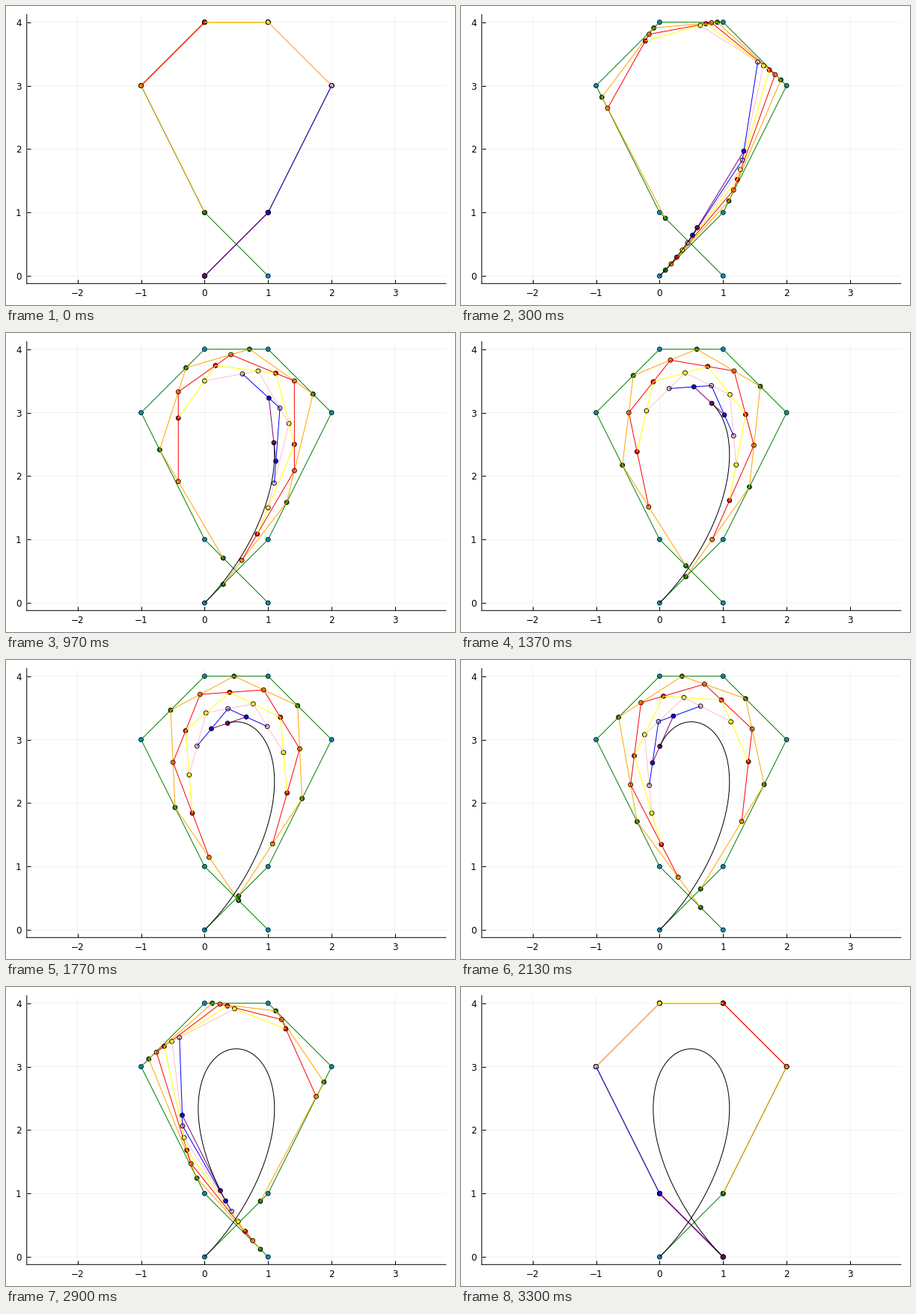
A matplotlib script for the animation above (3330 ms loop, 600x400 px).

```python
import numpy as np
import matplotlib.pyplot as plt
from matplotlib.animation import FuncAnimation

PX = 0.72  # one pixel in points at 100 dpi
W, H = 600, 400
LEFT, RIGHT, TOP, BOTTOM = 27.75, 587.9, 11.5, 371.3
STEPS = 100    # poses in one loop, at 30 per second
TICK = 10      # ms
LOOP = 3330    # ms

CONTROL = np.array([(0, 0), (1, 1), (2, 3), (1, 4),
                    (0, 4), (-1, 3), (0, 1), (1, 0)], float)
DOTS = ["#009af9", "green", "orange", "red", "yellow", "pink", "blue", "purple"]


def casteljau(t):
    """All levels of the construction, from control polygon to curve point."""
    levels = [CONTROL]
    while len(levels[-1]) > 1:
        p = levels[-1]
        levels.append((1 - t) * p[:-1] + t * p[1:])
    return levels


times = np.linspace(0, 1, STEPS)
curve = np.array([casteljau(t)[-1][0] for t in times])

plt.rcParams["font.family"] = "DejaVu Sans"
plt.rcParams["path.snap"] = False
fig = plt.figure(figsize=(W / 100, H / 100), dpi=100, facecolor="white")
ax = fig.add_axes([LEFT / W, 1 - BOTTOM / H,
                   (RIGHT - LEFT) / W, (BOTTOM - TOP) / H])

unit = (BOTTOM - TOP) / 4.24
half = (RIGHT - LEFT) / unit / 2
ax.set_xlim(0.5 - half, 0.5 + half)
ax.set_ylim(-0.12, 4.12)
ax.set_xticks(range(-2, 4))
ax.set_yticks(range(5))
ax.set_axisbelow(True)
ax.grid(color="black", alpha=0.1, linewidth=0.5 * PX)
ax.tick_params(direction="in", length=4.7 * PX, width=PX, pad=7 * PX,
               labelsize=12 * PX)
ax.spines[["top", "right"]].set_visible(False)
ax.spines[["left", "bottom"]].set_linewidth(PX)


def line(color, z):
    return ax.plot([], [], color=color, lw=PX, zorder=z,
                   solid_capstyle="butt", solid_joinstyle="round")[0]


def dots(color, z):
    # One size per dot keeps their positions finer than whole pixels.
    sizes = np.full(len(CONTROL), (5.8 * PX) ** 2)
    return ax.scatter(*CONTROL.T, s=sizes, facecolor=color,
                      edgecolor="black", linewidth=0.9 * PX, zorder=z)


# Each level's lines share the colour of the dots that slide along them.
marks = [dots(c, 3 + 2 * i) for i, c in enumerate(DOTS)]
lines = [line(c, 4 + 2 * i) for i, c in enumerate(DOTS[1:])]
trace = line("black", 30)


def update(tick):
    k = int((tick + 0.5) * TICK * 0.03)
    levels = casteljau(times[k])
    for artist, points in zip(marks, levels):
        artist.set_offsets(points)
    for artist, points in zip(lines, levels):
        artist.set_data(points.T)
    trace.set_data(curve[:k + 1].T)
    return [*marks, *lines, trace]


anim = FuncAnimation(fig, update, frames=LOOP // TICK, interval=TICK,
                     repeat=True, repeat_delay=0)
plt.show()
```
